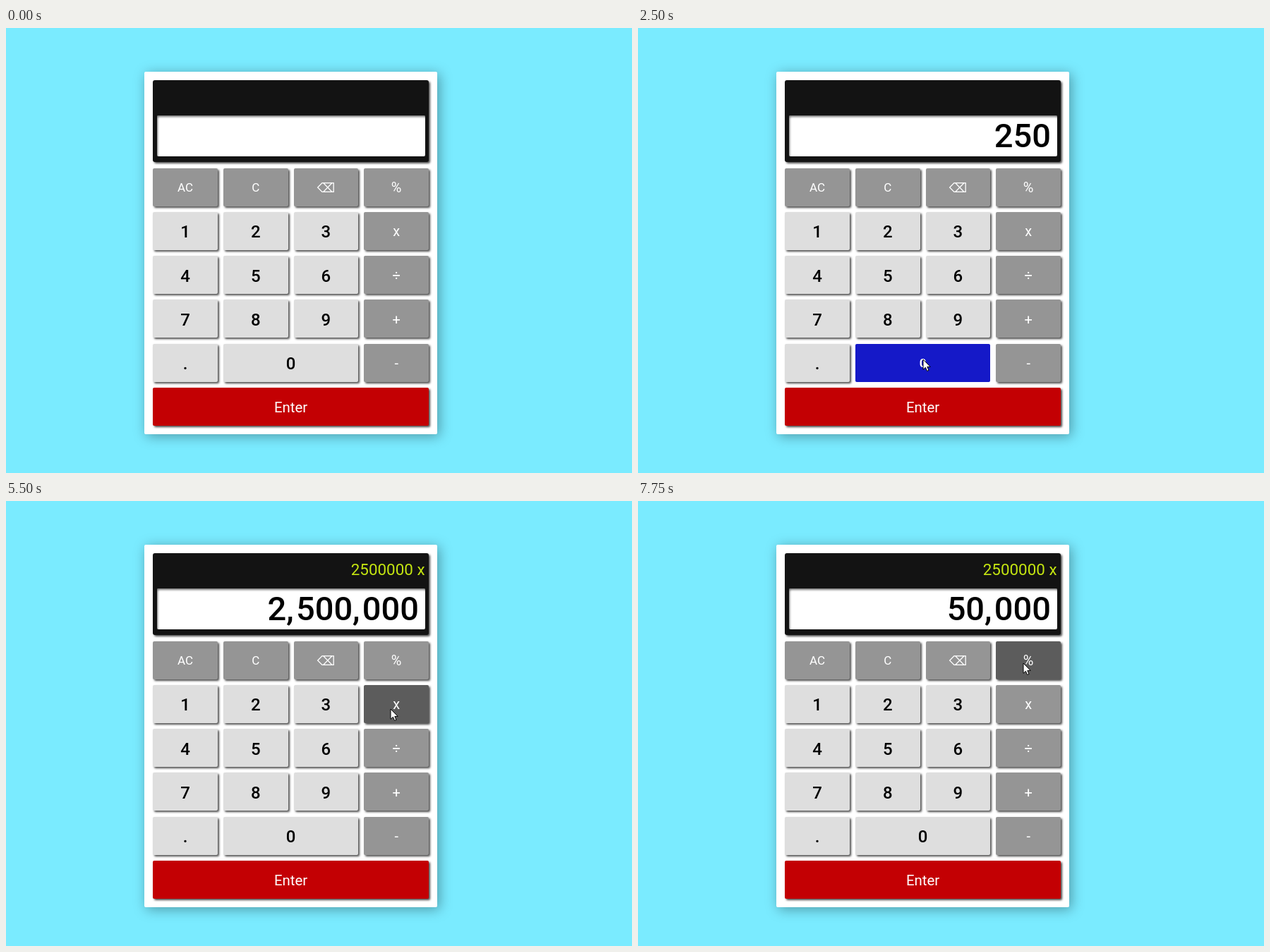
An HTML page that plays this animation: 887x631 px, repeating every 8 s.

```html
<!DOCTYPE html>
<html lang="en">
<head>
<meta charset="utf-8">
<title>Calculator</title>
<style>
  html, body { margin: 0; width: 100%; height: 100%; overflow: hidden; background: #7aebff; }
  body { position: relative; font-family: Roboto, sans-serif; }
  body * { position: absolute; box-sizing: border-box; }
  .panel {
    left: 196px; top: 62px; width: 415px; height: 514px; border-radius: 2px;
    background: #fff; box-shadow: 3px 3px 18px rgba(0, 0, 0, .35);
  }
  .screen {
    left: 208px; top: 74px; width: 391px; height: 116px; border-radius: 3px;
    background: #131313; box-shadow: 2px 2px 3px rgba(0, 0, 0, .7);
  }
  .memo {
    right: 5.5px; top: 10px; line-height: 27px; white-space: pre;
    font-size: 22.4px; color: #c5e611;
  }
  .value {
    left: 6px; top: 50px; width: 380px; height: 58px; padding-right: 9px; border-radius: 2px;
    background: #fff; box-shadow: inset 1px 2px 3px rgba(0, 0, 0, .55);
    font-size: 47px; font-weight: 500; line-height: 57px; text-align: right; color: #000;
  }
  .value i { position: static; font-style: normal; letter-spacing: 3.4px; }
  .key {
    height: 54px; border-radius: 2px; display: flex; align-items: center; justify-content: center;
    padding-top: 1px; box-shadow: 2px 2px 3px rgba(0, 0, 0, .7);
  }
  .num { font-size: 24px; font-weight: 500; padding-top: 3px; }
  .op { font-size: 20px; }
  .small { font-size: 17px; }
  .back { font: 18px "DejaVu Sans", sans-serif; }
  .enter { font-size: 20.4px; }
  .down { font-size: 17px; font-weight: 700; padding-top: 1px; box-shadow: none; }
  svg { left: 0; top: 0; width: 14px; height: 20px; overflow: visible; }
</style>
</head>
<body>
<div class="panel"></div>
<div class="screen">
  <div class="memo"></div>
  <div class="value"></div>
</div>
<svg id="cursor"><path d="M0 0V14.3L3.4 11.3L5.6 16.4L8 15.4L5.8 10.4H10.2Z" fill="#fff" stroke="#000"/></svg>
<script>
const LOOP = 8000, STEP = 250, FADE = 300;
const cursor = document.getElementById('cursor');
const memo = document.querySelector('.memo');
const value = document.querySelector('.value');

const themes = {
  num: { base: [222, 222, 222], over: [21, 25, 200], ink: 0 },
  op: { base: [149, 149, 149], over: [92, 92, 92], ink: 255 },
  enter: { base: [195, 0, 3], over: [195, 0, 3], ink: 255 }
};
const keys = {};

function addKey(label, col, row, span, theme, extra = '') {
  const el = document.createElement('div');
  el.className = `key ${theme} ${extra}`;
  el.textContent = label;
  el.style.left = 208.3 + 99.7 * col + 'px';
  el.style.top = 198.5 + 62.3 * row + 'px';
  el.style.width = 99.7 * span - 8.2 + 'px';
  document.body.insertBefore(el, cursor);
  keys[label] = { el, ...themes[theme] };
}

addKey('AC', 0, 0, 1, 'op', 'small');
addKey('C', 1, 0, 1, 'op', 'small');
addKey('⌫', 2, 0, 1, 'op', 'back');
['%', 'x', '÷', '+', '-'].forEach((s, row) => addKey(s, 3, row, 1, 'op'));
for (let n = 0; n < 9; n++) addKey(String(n + 1), n % 3, 1 + Math.floor(n / 3), 1, 'num');
addKey('.', 0, 4, 1, 'num');
addKey('0', 1, 4, 2, 'num');
addKey('Enter', 0, 5, 4, 'enter');

// Pointer path: time, x, y
const path = [
  [250, 364, 552], [500, 359, 405], [750, 356, 302], [1000, 358, 300], [1250, 358, 300],
  [1500, 366, 350], [1750, 368, 364], [2000, 374, 395], [2250, 403, 468], [2500, 404, 470],
  [3750, 404, 470], [4000, 410, 468], [4250, 480, 390], [4500, 540, 310], [4750, 545, 295],
  [5500, 545, 295], [5750, 530, 296], [6000, 430, 298], [6250, 362, 298], [6500, 361, 298],
  [6750, 361, 298], [7000, 380, 290], [7250, 470, 262], [7500, 546, 232], [7750, 546, 230]
];
// Hovered key: label, enter, leave
const hovers = [
  ['0', 340, 440], ['8', 490, 565], ['5', 565, 700], ['2', 714, 1400], ['5', 1450, 1950],
  ['8', 1960, 2080], ['0', 2090, 4050], ['9', 4180, 4290], ['÷', 4350, 4440],
  ['x', 4450, 5880], ['3', 5900, 6080], ['2', 6100, 7080], ['3', 7100, 7350], ['%', 7400, LOOP]
];
const presses = [['2', 1250], ['5', 1750], ['0', 2500], ['0', 3000], ['0', 3250], ['2', 6750]];
const entries = [
  [0, ''], [1250, '2'], [1750, '25'], [2500, '250'], [3000, '2,500'], [3250, '25,000'],
  [3500, '250,000'], [3750, '2,500,000'], [6750, '2'], [7750, '50,000']
];

const clamp = v => Math.min(1, Math.max(0, v));
const mix = (a, b, k) => a + (b - a) * k;

function hoverAmount(label, t) {
  let k = 0;
  for (const [name, start, end] of hovers) {
    if (name !== label || t < start) continue;
    const peak = clamp((Math.min(t, end) - start) / FADE);
    k = Math.max(k, clamp(peak - Math.max(0, t - end) / FADE));
  }
  return k;
}

function moveCursor(t) {
  cursor.style.visibility = t < path[0][0] ? 'hidden' : 'visible';
  const i = path.findLastIndex(p => p[0] <= t);
  if (i < 0) return;
  const a = path[i], b = path[i + 1] || a;
  const k = b === a ? 0 : (t - a[0]) / (b[0] - a[0]);
  cursor.style.transform = `translate(${mix(a[1], b[1], k)}px, ${mix(a[2], b[2], k)}px)`;
}

function draw(t) {
  for (const label in keys) {
    const { el, base, over, ink } = keys[label];
    const k = hoverAmount(label, t);
    const c = Math.round(mix(ink, 255, k));
    el.style.background = `rgb(${base.map((v, i) => Math.round(mix(v, over[i], k)))})`;
    el.style.color = `rgb(${c},${c},${c})`;
    el.classList.toggle('down', presses.some(p => p[0] === label && p[1] === t));
  }
  value.innerHTML = entries.findLast(e => e[0] <= t)[1].replace(/,/g, '<i>,</i>');
  memo.textContent = t >= 5500 ? '2500000 x' : '';
  moveCursor(t);
}

const origin = performance.now();
let shown = -1;
function tick() {
  const t = Math.floor(((performance.now() - origin) % LOOP) / STEP) * STEP;
  if (t !== shown) draw(shown = t);
  requestAnimationFrame(tick);
}
tick();
</script>
</body>
</html>
```
